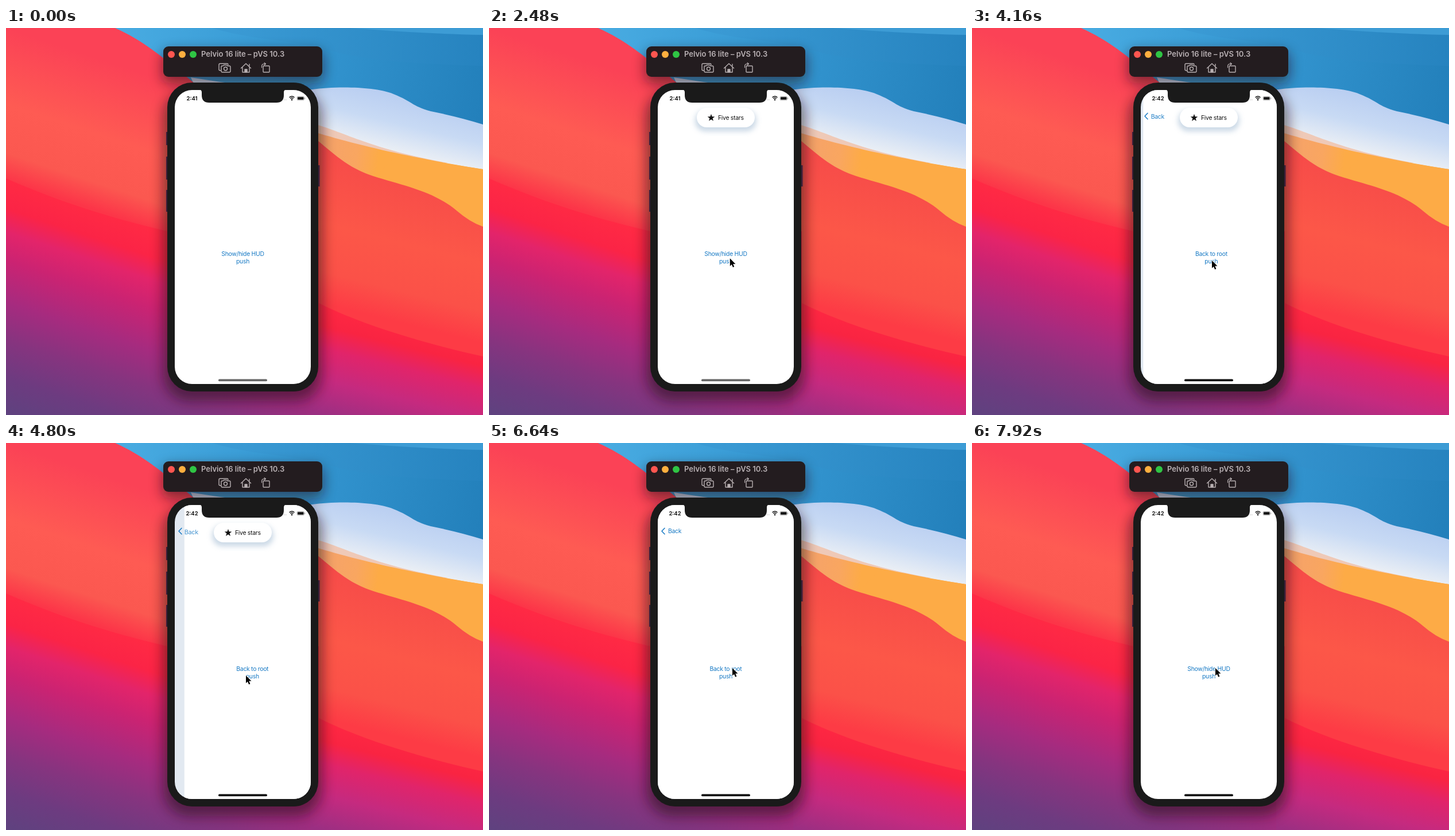
Animation, 831 px wide and 674 px high, one loop 8 s. Source, as an HTML page:

```html
<!DOCTYPE html>
<html lang="en">
<head>
<meta charset="utf-8">
<title>HUD demo</title>
<style>
html, body { margin: 0; width: 100%; height: 100%; overflow: hidden; background: #f84f50 }
svg { display: block; width: 831px; height: 674px }
text { font: 10.4px Inter, "Liberation Sans", sans-serif; letter-spacing: -.28px }
.link { fill: #1679c4 }
.link text { text-anchor: middle }
.icon { fill: none; stroke: #b8b0b2; stroke-width: 1.4; stroke-linejoin: round; stroke-linecap: round }
</style>
</head>
<body>
<svg viewBox="0 0 831 674">
  <defs>
    <linearGradient id="sky" gradientUnits="userSpaceOnUse" x1="190" y1="0" x2="831" y2="130">
      <stop stop-color="#49ace2"/><stop offset=".5" stop-color="#3496d1"/><stop offset="1" stop-color="#2380bb"/>
    </linearGradient>
    <linearGradient id="deep" gradientUnits="userSpaceOnUse" x1="400" y1="0" x2="831" y2="60">
      <stop stop-color="#3a9ad4"/><stop offset="1" stop-color="#2683bf"/>
    </linearGradient>
    <linearGradient id="mist" gradientUnits="userSpaceOnUse" x1="700" y1="115" x2="675" y2="220">
      <stop stop-color="#b8cdf1"/><stop offset=".5" stop-color="#c8daf4"/><stop offset="1" stop-color="#eef1f5"/>
    </linearGradient>
    <linearGradient id="coral" gradientUnits="userSpaceOnUse" x1="0" y1="0" x2="-79" y2="239">
      <stop stop-color="#fb4256"/><stop offset=".5" stop-color="#fe5b53"/>
      <stop offset=".82" stop-color="#fb5850"/><stop offset="1" stop-color="#fc3548"/>
    </linearGradient>
    <linearGradient id="dusk" gradientUnits="userSpaceOnUse" x1="0" y1="265" x2="-122" y2="634">
      <stop stop-color="#ff2a44"/><stop offset=".12" stop-color="#fb2446"/><stop offset=".22" stop-color="#e3246a"/>
      <stop offset=".34" stop-color="#cb2372"/><stop offset=".52" stop-color="#a62b7f"/>
      <stop offset=".68" stop-color="#86347f"/><stop offset=".84" stop-color="#6d3b80"/><stop offset="1" stop-color="#5e427f"/>
    </linearGradient>
    <linearGradient id="red" gradientUnits="userSpaceOnUse" x1="545" y1="200" x2="480" y2="462">
      <stop stop-color="#f64a49"/><stop offset=".5" stop-color="#fc5748"/>
      <stop offset=".8" stop-color="#fb5148"/><stop offset="1" stop-color="#fd3b45"/>
    </linearGradient>
    <linearGradient id="rose" gradientUnits="userSpaceOnUse" x1="545" y1="478" x2="499" y2="662">
      <stop stop-color="#ff2842"/><stop offset=".2" stop-color="#f92442"/><stop offset=".4" stop-color="#e1246a"/>
      <stop offset=".68" stop-color="#c52a7f"/><stop offset="1" stop-color="#9a2f82"/>
    </linearGradient>
    <linearGradient id="amber" gradientUnits="userSpaceOnUse" x1="545" y1="0" x2="700" y2="20">
      <stop stop-color="#f3a070"/><stop offset=".6" stop-color="#f9a660"/><stop offset=".85" stop-color="#fdab46"/>
    </linearGradient>
    <filter id="blur" x="-30%" y="-30%" width="160%" height="160%"><feGaussianBlur stdDeviation="11"/></filter>
    <filter id="soft" x="-30%" y="-70%" width="160%" height="240%"><feGaussianBlur stdDeviation="5"/></filter>
    <clipPath id="screen"><rect x="294" y="108" width="237" height="512" rx="30"/></clipPath>
  </defs>

  <!-- wallpaper -->
  <rect width="831" height="674" fill="url(#sky)"/>
  <path d="M360 0C430 22 500 20 560 38S700 62 831 66V0Z" fill="url(#deep)"/>
  <path d="M600 0C680 6 740 10 831 12V0Z" fill="#3d9cd5"/>
  <path d="M322 86Q440 106 534 107C570 102 640 101 675 115S705 135 740 145Q790 155 831 168V260H400Z" fill="url(#mist)"/>
  <path d="M540 168C590 182 640 212 770 235L640 232 540 210Z" fill="#efc9b7"/>
  <path d="M540 182C580 194 640 210 700 222S790 240 831 246V360H540Z" fill="url(#amber)"/>
  <path d="M682 221C664 236 654 250 640 258L831 350V246Q740 232 682 221Z" fill="#fdab46"/>
  <path d="M530 186C565 212 590 242 640 258S745 284 785 318Q808 338 831 346V674H530Z" fill="url(#red)"/>
  <path d="M530 471C590 505 700 543 831 572V674H530Z" fill="url(#rose)"/>
  <path d="M0 0H190C240 22 275 52 345 110V400H0Z" fill="url(#coral)"/>
  <path d="M0 262C80 297 170 328 281 354H545V674H0Z" fill="url(#dusk)"/>
  <path d="M530 471L545 478V674H530Z" fill="url(#rose)"/>

  <!-- window shadows -->
  <g filter="url(#blur)" fill="#200818" opacity=".55">
    <rect x="272" y="40" width="281" height="56" rx="12"/>
    <rect x="274" y="108" width="277" height="542" rx="46"/>
  </g>

  <!-- toolbar -->
  <rect x="274" y="32" width="277" height="53" rx="9" fill="#231c1f"/>
  <circle cx="288" cy="46" r="6" fill="#ff5650"/>
  <circle cx="307" cy="46" r="6" fill="#fdaf3f"/>
  <circle cx="326" cy="46" r="6" fill="#2fc544"/>
  <text x="340" y="50.3" fill="#b9b1b4" style="font-size:13px;font-weight:600;letter-spacing:0">Pelvio 16 lite – pVS 10.3</text>
  <g class="icon">
    <path d="M374 74H373Q371 74 371 72V64Q371 62 373 62H385Q387 62 387 64"/>
    <path d="M376 66H378L379.5 64.5H384.5L386 66H389Q391 66 391 68V75Q391 77 389 77H377Q375 77 375 75V67Q375 66 376 66Z"/>
    <circle cx="382.5" cy="71" r="3"/>
    <path d="M409.500 70L418 62 426.500 70M412 69V77H424V69M424 66V63"/>
    <path d="M416 77V72H420V77Z" fill="#b8b0b2"/>
    <rect x="448" y="66" width="11" height="11" rx="1"/>
    <path d="M445.500 69V67Q445.500 62.500 450 62.500H452M450 60.500L452.500 62.500 450 64.500" stroke-width="1.2"/>
  </g>

  <!-- phone -->
  <path d="M279 181h4v23h-4ZM279 224h4v40h-4ZM279 282h4v38h-4ZM542 239h4.500v37h-4.500Z" fill="#3b1e3a"/>
  <rect x="281" y="95" width="263" height="538" rx="43" fill="#1a1a1a"/>
  <g clip-path="url(#screen)">
    <rect x="294" y="108" width="237" height="512" fill="#fff"/>
    <g id="under" class="link"><text x="412.500" y="397"></text><text x="412.500" y="409.700">push</text></g>
    <rect id="dim" x="294" y="108" width="237" height="512" fill="#1f5a96"/>
    <g id="top" class="link">
      <rect x="294" y="108" width="237" height="512" fill="#fff"/>
      <text x="412.500" y="397"></text><text x="412.500" y="409.700">push</text>
    </g>
    <path id="chevron" d="M306 148.300L301 153.500 306 158.700" fill="none" stroke="#1679c4" stroke-width="1.5" stroke-linecap="round" stroke-linejoin="round"/>
    <text id="back" class="link">Back</text>
    <g id="hud">
      <rect x="359" y="143" width="107" height="37" rx="18" fill="#a9c0d6" opacity=".6" filter="url(#soft)"/>
      <rect x="362" y="139" width="101" height="34" rx="17" fill="#fff"/>
      <path id="star" fill="#111"/>
      <text x="399" y="160" fill="#111">Five stars</text>
    </g>
    <text id="clock" x="324" y="125.700" text-anchor="middle" style="font-size:9.5px;font-weight:600;letter-spacing:0"></text>
    <path d="M484 125h1.200M487 125h1.200" stroke="#999"/>
    <g fill="none" stroke="#111" stroke-width="1.500">
      <path d="M493.500 121Q498 117 502.500 121M495.300 123Q498 120.600 500.700 123"/>
      <circle cx="498" cy="125" r=".6"/>
      <rect x="507" y="119.300" width="12.500" height="6.500" rx="2" stroke="#999" stroke-width=".8"/>
      <path d="M520.800 121.500v2" stroke="#999" stroke-width="1"/>
    </g>
    <rect x="508" y="120.300" width="10.500" height="4.500" rx="1.200" fill="#111"/>
    <rect id="home" x="370" y="611.500" width="85" height="3.800" rx="1.900"/>
  </g>
  <path d="M337 107Q341 108 341 112V117Q341 130 354 130H471Q484 130 484 117V112Q484 108 488 107Z" fill="#1a1a1a"/>

  <path id="cursor" d="M0 0V13.300L3 10.500 5.100 15.400 7.400 14.400 5.300 9.600H9.500Z" fill="#000" stroke="#fff" stroke-width="1.300" paint-order="stroke"/>
</svg>
<script>
const LOOP = 8000, STEP = 80, WIDTH = 237, PARALLAX = 71;
const ROOT = 'Show/hide HUD', PAGE = 'Back to root';
const PUSHES = [2990, 3830, 4560], POP = 6900;
const HUD_IN = 1900, HUD_OUT = 5000;
// time, x, y of the pointer tip
const PATH = [[1000, 452, 432], [1500, 424, 393], [2250, 424, 393], [2560, 419, 403],
  [2700, 418, 405], [5900, 418, 405], [6350, 424, 392], [8000, 424, 392]];

const $ = id => document.getElementById(id);
const clamp = v => Math.max(0, Math.min(1, v));
const move = (el, x, y = 0, scale = 1) => el.setAttribute('transform', `translate(${x} ${y}) scale(${scale})`);
const fade = (el, v) => el.setAttribute('opacity', clamp(v));
const label = (el, s) => el.querySelector('text').textContent = s;

// Distance left (1 to 0) of a critically damped spring
function rest(ms, rate = 18) {
  const u = Math.max(0, ms) / 1000 * rate;
  return u > 14 ? 0 : (1 + u) * Math.exp(-u);
}

function pointer(t) {
  const i = PATH.findIndex(p => p[0] > t);
  const [t0, x0, y0] = PATH[i - 1], [t1, x1, y1] = PATH[i];
  const u = (t - t0) / (t1 - t0), k = u * u * (3 - 2 * u);
  return [x0 + (x1 - x0) * k, y0 + (y1 - y0) * k];
}

function drawPages(t) {
  const depth = PUSHES.filter(s => t >= s).length;
  const popping = t >= POP;
  // share of the upper page still off to the right
  const away = !depth ? 1 : popping ? 1 - rest(t - POP) : rest(t - PUSHES[depth - 1]);
  const offset = WIDTH * away;
  label($('under'), depth < 2 || popping ? ROOT : PAGE);
  label($('top'), PAGE);
  move($('under'), -PARALLAX * (1 - away));
  move($('top'), offset);
  fade($('dim'), .14 * (1 - away));
  if (popping) {
    move($('back'), 312 + offset * .1, 157.300);
    fade($('back'), 1 - away * 2);
    fade($('chevron'), 1 - away * 2);
  } else {
    move($('back'), 312 - offset * .08, 157.300 + offset * .13, 1 + offset * .0025);
    fade($('back'), 1 - offset * .012);
    fade($('chevron'), depth > 1 ? 1 : depth ? 1 - offset / 25 : 0);
  }
}

function draw(t) {
  drawPages(t);
  const hidden = t < HUD_OUT ? rest(t - HUD_IN, 16) : 1 - rest(t - HUD_OUT, 16);
  move($('hud'), 0, -50 * hidden);
  fade($('hud'), 1 - hidden);
  $('clock').textContent = t < 3520 ? '2:41' : '2:42';
  $('home').setAttribute('fill', t < PUSHES[0] ? '#666' : '#111');
  const shown = t >= PATH[0][0];
  fade($('cursor'), +shown);
  if (shown) move($('cursor'), ...pointer(t));
}

$('star').setAttribute('d', 'M' + Array.from({length: 10}, (_, i) => {
  const r = i % 2 ? 2.7 : 6.7, a = i * Math.PI / 5;
  return [387 + r * Math.sin(a), 156.500 - r * Math.cos(a)].map(v => v.toFixed(2));
}).join('L') + 'Z');

const start = performance.now();
function tick() {
  const t = (performance.now() - start) % LOOP;
  draw(Math.floor(t / STEP) * STEP);
  requestAnimationFrame(tick);
}
tick();
</script>
</body>
</html>
```
